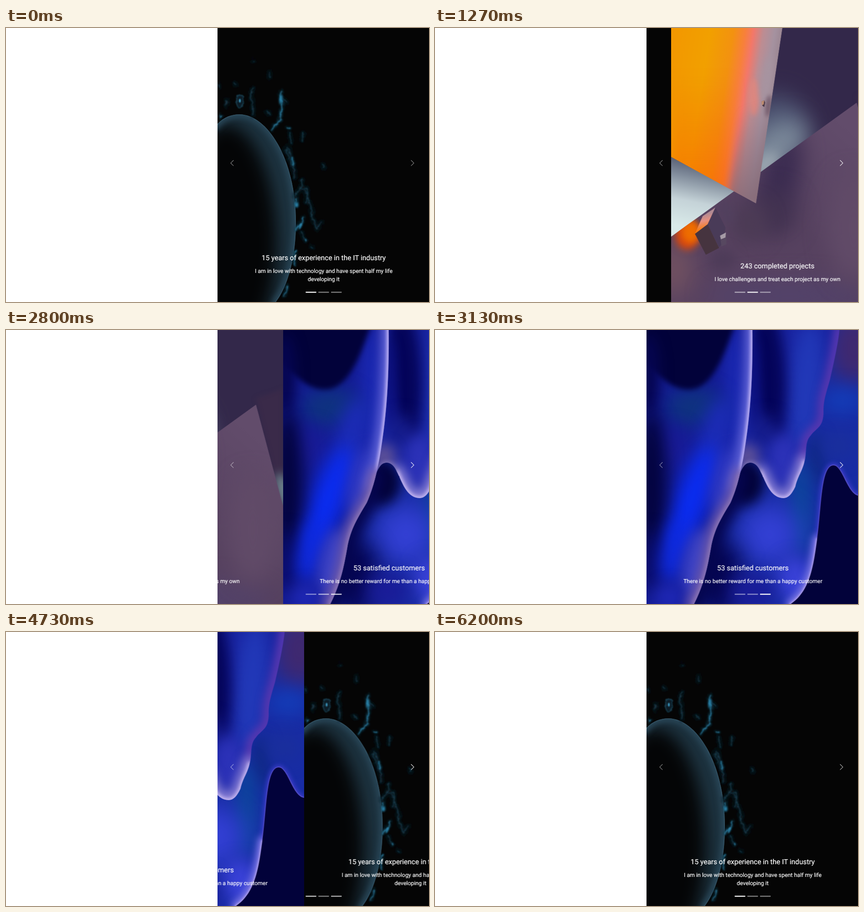
An HTML page that plays this animation: 928 by 603 pixels, repeating every 6.27 s.

```html
<!DOCTYPE html>
<html lang="en">
<head>
<meta charset="utf-8">
<title>Carousel</title>
<style>
  html, body { margin: 0; width: 100%; height: 100%; overflow: hidden; background: #fff; }
  #carousel { position: absolute; left: 464px; top: 0; width: 464px; height: 603px; overflow: hidden; background: #050505; }
  #carousel > svg { position: absolute; left: 0; top: 0; }
  .slide { will-change: transform; }
  text { font-family: Roboto, sans-serif; font-size: 12.37px; fill: #fff; stroke: #fff; stroke-width: .2; text-anchor: middle; text-rendering: geometricPrecision; }
  .title { font-size: 15.46px; }
  .chevron { fill: none; stroke: #fff; stroke-width: 1.15; }
</style>
</head>
<body>
<div id="carousel"></div>
<script>
const W = 466, H = 603, FPS = 15, LOOP = 6270;
const STARTS = [908, 2556, 4528];
const carousel = document.getElementById('carousel');

// Drawing helpers
const soft = b => b ? `style="filter:blur(${b}px)"` : '';
const shape = (d, fill, b = 0) => `<path d="${d}" fill="${fill}" ${soft(b)}/>`;
const line = (d, color, width, b = 0) =>
  `<path d="${d}" fill="none" stroke="${color}" stroke-width="${width}" stroke-linecap="round" ${soft(b)}/>`;
const blob = (x, y, rx, ry, color, b, angle = 0) =>
  `<ellipse rx="${rx}" ry="${ry}" transform="translate(${x} ${y}) rotate(${angle})" fill="${color}" ${soft(b)}/>`;
const form = (id, d, fill, inner) =>
  `<clipPath id="${id}"><path d="${d}"/></clipPath><g clip-path="url(#${id})">${shape(d, fill)}${inner}</g>`;
const gradient = (id, x1, y1, x2, y2, ...stops) =>
  `<linearGradient id="${id}" gradientUnits="userSpaceOnUse" x1="${x1}" y1="${y1}" x2="${x2}" y2="${y2}">` +
  stops.map(([at, color, alpha = 1]) => `<stop offset="${at}" stop-color="${color}" stop-opacity="${alpha}"/>`).join('') +
  '</linearGradient>';
const caption = (title, ...lines) => {
  const top = 557.2 - 18.55 * (lines.length - 1);
  return `<text class="title" x="233" y="${top - 27.8}">${title}</text>` +
    lines.map((s, i) => `<text x="233" y="${top + 18.55 * i}">${s}</text>`).join('');
};

function planet() {
  const edge = 'M-4 216C10 197 30 190 48 190C110 190 173 290 172 430C172 500 156 566 128 603';
  const strong = 'M140 138q-5 14 2 24q-1 18 -5 40q-4 8 -12 11l-6 12M49 159v2M6 194v2M154 219l3 3' +
    'M163 284l4 18M173 374l-1 16M187 417q-2 17 -15 26M181 430l-3 8M171 492l-2 28M153 568q0 10 -7 20M193 466l1 2';
  const faint = 'M79 72v1M115 97l-1 12M20 158v14M37 123l5 3M2 125l2 6M78 132q-8 14 -2 30l2 30M108 184l6 6' +
    'M143 156l10 8M188 230l-3 18M231 300l2 8M148 270q9 -14 11 8l4 22M158 232l4 20' +
    'M186 332q-4 16 2 22q14 -4 9 22M185 350l-16 20M190 357q16 28 18 57q5 18 11 28l9 -16' +
    'M196 362l-2 22M184 450l10 18M205 481l3 2M168 303v28M150 260l6 28';
  return `<filter id="smoke" x="-10%" y="-10%" width="120%" height="120%">
      <feTurbulence type="fractalNoise" baseFrequency=".09" numOctaves="3" seed="4" result="n"/>
      <feDisplacementMap in="SourceGraphic" in2="n" scale="9" xChannelSelector="R" yChannelSelector="G"/>
      <feGaussianBlur stdDeviation=".8"/></filter>` +
    shape('M0 0H466V603H0Z', '#050505') +
    form('ball', edge + 'H-4Z', '#1d3340',
      blob(30, 450, 100, 238, '#040506', 18, -3) +
      line(edge, '#284556', 16, 6) + line(edge, '#3c5e70', 2, 1)) +
    `<g filter="url(#smoke)">` +
    line(faint, '#0a1a22', 8, 3) + line(faint, '#143746', 1.8) +
    line(strong, '#103a4c', 6, 2.5) + line(strong, '#256f90', 2.2) +
    `<ellipse cx="49" cy="161" rx="8" ry="15" fill="#0a1c26" stroke="#1b4355" stroke-width="2"/></g>` +
    blob(49, 160, 2, 4, '#3d9cc4', 1.2) + blob(174, 389, 3, 6, '#2f94c2', 2) +
    blob(139, 157, 3, 11, '#2b85ad', 2, 6) + blob(182, 436, 2, 7, '#2b85ad', 1.5, 20) +
    caption('15 years of experience in the IT industry',
      'I am in love with technology and have spent half my life', 'developing it');
}

function paper() {
  const panel = 'M0 0H244L186 386L0 284Z';
  return gradient('sun', 0, 0, 240, 36, [0, '#f39700'], [.35, '#f2a000'], [.56, '#f39210'], [.67, '#f8803c'],
      [.74, '#f3786a'], [.83, '#bd8d93'], [.93, '#a592a0'], [1, '#9c8793']) +
    gradient('warm', 0, 100, 0, 370, [0, '#f96400', 0], [1, '#f96000', .6]) +
    gradient('dusk', 150, 180, 215, 380, [0, '#846875', 0], [1, '#846875', .9]) +
    gradient('steel', 52, 275, 20, 435, [0, '#434a60'], [.3, '#7c8797'], [.65, '#c5d3d8'], [1, '#d9eae9']) +
    gradient('ground', 100, 600, 410, 240, [0, '#594361'], [.5, '#574260'], [1, '#624c6b']) +
    gradient('lit', 110, 460, 97, 404, [0, '#ef7800'], [.45, '#f57e18'], [.75, '#e79080'], [1, '#b28b94']) +
    shape('M0 0H466V603H0Z', '#33284a') +
    blob(235, 215, 62, 70, '#4b5270', 26, -20) + blob(225, 265, 85, 48, '#7b899a', 26, -36) +
    blob(204, 303, 40, 24, '#98a4af', 13, -38) +
    shape('M407 150L466 130V400Z', '#3a2a49', 5) + blob(468, 358, 12, 45, '#78969b', 10, -14) +
    shape('M0 284L140 359L0 460Z', 'url(#steel)') +
    form('floor', 'M0 459L407 164L466 386V603H0Z', 'url(#ground)',
      blob(240, 325, 42, 105, '#3a2b50', 25, 12) + blob(225, 410, 48, 50, '#433351', 25) +
      blob(170, 430, 40, 45, '#4c3b55', 20) + blob(5, 530, 40, 60, '#715160', 25) +
      blob(260, 590, 180, 35, '#52426a', 25) + blob(400, 440, 55, 120, '#614b68', 25) +
      blob(35, 455, 27, 33, '#d8480f', 8) + blob(43, 448, 20, 25, '#ee6d00', 7) +
      blob(113, 510, 30, 24, '#4e3c59', 12) + blob(120, 405, 13, 30, '#51405e', 9, -20)) +
    form('panel', panel, 'url(#sun)',
      shape('M0 0H150L125 386H0Z', 'url(#warm)', 12) +
      blob(181, 152, 11, 42, '#dc8780', 5) + blob(210, 110, 12, 50, '#a794a0', 8, 8) +
      shape('M160 130H250V390H120Z', 'url(#dusk)', 8) +
      blob(213, 172, 6, 24, '#745c6d', 4, 6)) +
    shape('M198 162l6 -3l2 5l-2 10l-4 -3Z', '#4a3746') + shape('M198 162l6 -3l-1 9l-4 2Z', '#bd8c70') +
    shape('M52 453L69 414L97 395L80 432Z', 'url(#lit)') +
    shape('M80 432L97 395L119 439L114 473L105 482Z', '#493b58') +
    shape('M52 453L80 432L105 484L76 499Z', '#46343f') +
    shape('M108 464L121 458L121 476L110 481Z', '#574860') +
    shape('M107 457L120 450L119 461L109 465Z', '#a69ba6') +
    caption('243 completed projects', 'I love challenges and treat each project as my own');
}

function waves() {
  const leftTop = 'M232 -10C233 100 228 180 216 256C212 285 205 318 198 342';
  const leftLow = 'M204 320C198 350 190 368 184 380C165 412 148 438 141 480C134 520 126 560 104 603';
  const left = 'M0 0H232C233 100 228 180 216 256C210 300 198 350 184 380C165 412 148 438 141 480C134 520 126 560 104 603H0Z';
  const dropSide = 'C420 30 410 75 402 110C390 150 388 160 388 180C388 215 372 215 360 232C346 246 352 270 346 290';
  const dropTip = 'C341 312 332 320 326 345C318 362 310 370 300 370C270 370 260 330 250 312';
  const dropArch = 'C244 298 236 292 228 292C216 292 210 302 203 320';
  const foot = 'M316 603C358 575 366 520 374 460';
  const arch = 'C384 390 382 298 410 298C430 298 440 362 466 365';
  return shape('M0 0H466V603H0Z', '#182ca4') +
    blob(455, 40, 55, 80, '#40296f', 25) + blob(430, 155, 45, 30, '#143bb6', 18) +
    blob(372, 285, 16, 60, '#0f287f', 16) + blob(420, 255, 38, 30, '#1a2f9c', 18) +
    blob(338, 390, 24, 105, '#0d459c', 17) +
    blob(270, 450, 65, 65, '#3340d4', 28) + blob(325, 550, 40, 50, '#3a42d8', 18) +
    blob(160, 545, 50, 85, '#050552', 24) + blob(230, 575, 50, 40, '#1a1c98', 22) +
    blob(215, 335, 42, 50, '#020234', 14) + line(leftLow, '#05054e', 46, 14) +
    line(foot + arch, '#3a3cc8', 10, 5) + line(foot, '#7b78e6', 20, 8) +
    line(foot + arch, '#6a5cd2', 2.5, .8) + line(foot, '#b6a8ee', 5, 2) +
    shape(foot + arch + 'V603Z', '#02023a') +
    form('drop', 'M200 0H423' + dropSide + dropTip + dropArch + 'L150 320Z', '#1823a0',
      blob(350, 130, 38, 150, '#2138b8', 18, 4) + blob(268, 90, 36, 150, '#04045a', 14, -4) +
      blob(238, 120, 10, 100, '#0c1080', 10) +
      blob(260, 225, 30, 35, '#161d8c', 18) +
      blob(300, 290, 34, 60, '#2c32b8', 16) + blob(222, 280, 26, 30, '#5c5098', 13) +
      line('M423 0' + dropSide, '#5738b0', 26, 9) +
      line('M346 290' + dropTip, '#8e84d8', 32, 11) +
      line('M346 290' + dropTip, '#c9baf2', 8, 3.5) +
      line('M250 312' + dropArch, '#857ab4', 6, 4)) +
    form('left', left, '#141c94',
      blob(195, 140, 26, 150, '#1a28b2', 16) +
      blob(105, 170, 65, 42, '#0f3280', 20) +
      shape('M-20 -20H196C172 50 146 131 92 131C48 131 22 92 -20 60Z', '#02023a', 6) +
      blob(5, 100, 24, 90, '#050550', 14) +
      blob(150, 230, 32, 85, '#1b2bb6', 18, 15) + blob(55, 260, 36, 45, '#1a1c98', 20) +
      blob(100, 370, 37, 120, '#0a2cf2', 20, 20) + blob(170, 330, 22, 75, '#343dc8', 16, 14) +
      blob(10, 340, 34, 165, '#03033e', 18) + blob(8, 510, 24, 70, '#080a64', 18) +
      blob(60, 485, 26, 70, '#0d2ae2', 18, 10) + blob(105, 510, 24, 75, '#3c42c6', 14, 12) +
      blob(50, 590, 35, 30, '#1e27b4', 16) +
      line(leftTop, '#6568dc', 34, 11) + line(leftTop, '#cfc0f8', 8, 3.5) +
      line(leftLow, '#6f5cb0', 36, 11) + line(leftLow, '#8e78b4', 9, 4)) +
    caption('53 satisfied customers', 'There is no better reward for me than a happy customer');
}

const svg = (cls, body) => `<svg class="${cls}" width="${W}" height="${H}" viewBox="0 0 ${W} ${H}">${body}</svg>`;
const bars = [0, 1, 2].map(i =>
  `<rect class="bar" x="${193.5 + 27.84 * i}" y="580.4" width="23.2" height="2.3" fill="#fff"/>`).join('');
carousel.innerHTML = [planet, paper, waves].map(draw => svg('slide', draw())).join('') +
  svg('controls', bars +
    '<path class="chevron" opacity=".5" d="M35.2 291l-6.2 6.2l6.2 6.2"/>' +
    '<path class="chevron" id="next" d="M424.6 291l6.2 6.2l-6.2 6.2"/>');

const slides = document.querySelectorAll('.slide');
const marks = document.querySelectorAll('.bar');
const next = document.getElementById('next');

// cubic-bezier(.25, .1, .25, 1)
function ease(x) {
  if (x <= 0) return 0;
  if (x >= 1) return 1;
  let lo = 0, hi = 1;
  for (let i = 0; i < 24; i++) {
    const s = (lo + hi) / 2;
    if (.75 * s * (1 - s) + s ** 3 < x) lo = s; else hi = s;
  }
  return .3 * lo * (1 - lo) ** 2 + 3 * lo * lo * (1 - lo) + lo ** 3;
}

function render(now) {
  // The picture advances at 15 steps a second
  const t = Math.floor((now % LOOP + 4) * FPS / 1000) * 1000 / FPS;
  const progress = STARTS.reduce((sum, start) => sum + ease((t - start) / 600), 0);
  slides.forEach((slide, i) => {
    const offset = (i - progress + 4) % 3 - 1;
    slide.style.transform = `translateX(${offset * W}px)`;
    marks[i].setAttribute('opacity', .5 + .5 * Math.max(0, 1 - Math.abs(offset)));
  });
  const hover = ease((t - 170) / 150) - ease((t - 6150) / 150);
  next.setAttribute('opacity', .5 + .4 * hover);
}

const begin = performance.now();
function tick() {
  render(performance.now() - begin);
  requestAnimationFrame(tick);
}
tick();
</script>
</body>
</html>
```
